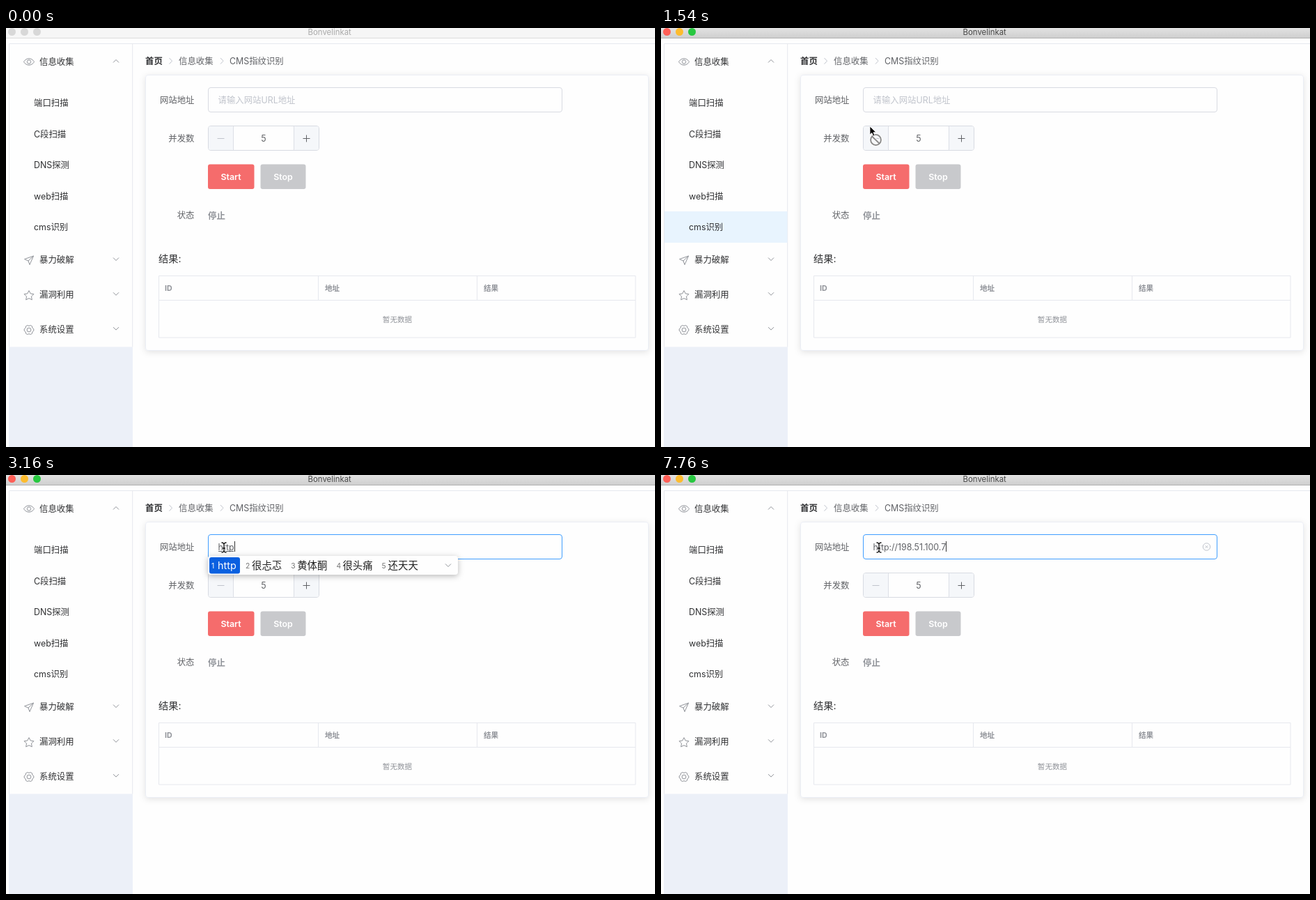
These frames come from a looping animation (932 by 601 pixels, 8 s). An HTML page:

```html
<!DOCTYPE html>
<html lang="zh-CN">
<head>
<meta charset="utf-8">
<style>
  html, body { margin: 0; width: 100%; height: 100%; overflow: hidden; background: #fefefe; }
  svg { display: block; font: 12.4px Inter, "Noto Sans CJK SC", "Noto Sans CJK", sans-serif; }
  .line { fill: none; stroke: #909399; stroke-width: 1; stroke-linejoin: round; }
  .edge { fill: none; stroke: #e6e8ee; }
  .box { fill: #fefefe; stroke: #d8dbe2; }
  .card { fill: #fefefe; stroke: #ebeef5; filter: drop-shadow(0 2px 5px rgba(0, 0, 0, .11)); }
  .popup { fill: #fefefe; filter: drop-shadow(0 2px 4px rgba(0, 0, 0, .28)); }
  .pointer { stroke: #fff; stroke-width: .8; }
</style>
</head>
<body>
<svg id="stage" width="932" height="601" viewBox="0 0 932 601"></svg>
<script>
const stage = document.getElementById('stage');
const DARK = '#303133', MID = '#606266', GRAY = '#909399', PALE = '#c0c4cc';

// y is the vertical centre of the line of text
function label(x, y, text, color = DARK, { size = 12.4, weight = 400, anchor = 'start', id = '' } = {}) {
  return `<text id="${id}" x="${x}" y="${y + size * .365}" fill="${color}" font-size="${size}"
    font-weight="${weight}" text-anchor="${anchor}">${text}</text>`;
}
const rect = (x, y, w, h, attrs) => `<rect x="${x}" y="${y}" width="${w}" height="${h}" ${attrs}/>`;
const path = (d, attrs = 'class="line"') => `<path d="${d}" ${attrs}/>`;
const chevron = (x, y, dir) => path(`M${x - 4} ${y - 2 * dir}l4 ${4 * dir}l4 ${-4 * dir}`);
const crumbArrow = x => path(`M${x - 2} 43l4 4.3l-4 4.3`, `fill="none" stroke="${PALE}"`);

function ring(cx, cy, count, radius) {
  return Array.from({ length: count }, (_, i) => {
    const a = i * 2 * Math.PI / count - Math.PI / 2, r = radius(i);
    return `${(cx + r * Math.cos(a)).toFixed(1)} ${(cy + r * Math.sin(a)).toFixed(1)}`;
  }).join('L');
}

function titleBar() {
  const lights = [8.5, 26.5, 44.5].map(x => `<circle class="light" cx="${x}" cy="5.5" r="5.5"/>`).join('');
  return `<linearGradient id="metal" x2="0" y2="1"><stop stop-color="#e2e2e2"/>
    <stop offset="1" stop-color="#cfcfcf"/></linearGradient>` +
    rect(0, 0, 932, 14, 'id="bar"') + rect(0, 14, 932, 1, 'id="barEdge"') + lights +
    label(464.7, 5.8, 'Bonvelinkat', '', { size: 11.4, anchor: 'middle', id: 'title' });
}

function sidebar() {
  const items = ['端口扫描', 'C段扫描', 'DNS探测', 'web扫描', 'cms识别'];
  const groups = ['暴力破解', '漏洞利用', '系统设置'];
  return rect(4, 457.5, 178, 144, 'fill="#ecf0f8"') +
    path('M932 22.5H4.5V457.5M181.7 22.5V457.5', 'class="edge"') +
    rect(5, 263, 176.5, 45, 'id="hover" fill="#e8f4fe"') +
    path('M25.5 48.5C29 42.3 37 42.3 40.5 48.5C37 54.7 29 54.7 25.5 48.5Z') +
    '<circle class="line" cx="33" cy="48.5" r="2.7"/>' +
    label(48, 48, '信息收集') + chevron(158, 47.5, -1) +
    items.map((s, i) => label(40, 107.7 + 44.5 * i, s)).join('') +
    groups.map((s, i) => label(48, 332.6 + 49.8 * i, s) + chevron(158, 331.5 + 49.8 * i, 1)).join('') +
    path('M26.5 331.5L39.5 327L34 339.5L32 334Z M32 334L39.5 327') +
    path(`M${ring(33, 384, 10, i => i % 2 ? 3.7 : 7.3)}Z`) +
    path(`M${ring(33, 433, 18, i => i % 3 ? 6.9 : 5.7)}Z`) +
    '<circle class="line" cx="33" cy="433" r="2.9"/>';
}

function form() {
  const right = { anchor: 'end' }, middle = { anchor: 'middle' };
  const button = { anchor: 'middle', weight: 600 };
  return label(200, 47.3, '首页', DARK, { weight: 700 }) + crumbArrow(236.5) +
    label(248, 47.3, '信息收集', MID) + crumbArrow(310) + label(321, 47.3, 'CMS指纹识别', MID) +
    rect(200.5, 67.5, 722, 395, 'rx="3.5" class="card"') +
    label(270.5, 103.3, '网站地址', MID, right) +
    rect(290.5, 85.5, 508, 35, 'rx="3.5" class="box" id="field"') +
    label(304.5, 103.3, '请输入网站URL地址', PALE, { id: 'hint' }) +
    label(304.5, 103.3, '', MID, { id: 'entry' }) +
    rect(305, 109, 0, 1, `id="underline" fill="${MID}"`) +
    rect(305, 95, 1, 15, 'id="caret" fill="#333"') +
    `<g id="clear" fill="none" stroke="${PALE}"><circle cx="783.5" cy="103" r="5.2"/>
      <path d="M781.7 101.2l3.6 3.6m0-3.6l-3.6 3.6"/></g>` +
    label(270.5, 158.3, '并发数', MID, right) +
    rect(290.5, 140.5, 159, 35, 'rx="3.5" class="box"') +
    rect(291, 141, 35.5, 34, 'rx="3" fill="#f5f7fa"') + rect(413.5, 141, 35.5, 34, 'rx="3" fill="#f5f7fa"') +
    path('M326.5 141v34M413.5 141v34', 'stroke="#dcdfe6"') +
    path('M303.5 158.5h10', `stroke="${PALE}"`) + path('M426.5 158.5h10m-5-5v10', `stroke="${MID}"`) +
    label(370, 158.5, '5', MID, middle) +
    rect(290, 195.5, 66.5, 35.5, 'rx="3" fill="#f56c6c"') + label(323, 213.5, 'Start', '#fff', button) +
    rect(365.5, 195.5, 65, 35.5, 'rx="3" fill="#c8c9cc"') + label(398, 213.5, 'Stop', '#fff', button) +
    label(270.5, 268.8, '状态', MID, right) + label(290, 269.5, '停止', GRAY, { weight: 700 });
}

function results() {
  const head = { size: 10.6, weight: 700 };
  return label(219, 331.2, '结果:', DARK, { size: 14.2 }) +
    path('M219.5 355.5H904V444H219.5ZM219.5 390.5H904M448.5 355.5v35M676.5 355.5v35', 'class="edge"') +
    label(228, 373.5, 'ID', GRAY, head) + label(458, 373.5, '地址', GRAY, head) +
    label(686, 373.5, '结果', GRAY, head) +
    label(562, 418, '暂无数据', GRAY, { size: 10.6, anchor: 'middle' });
}

function pointers() {
  return `<g id="blocked" fill="none"><circle cx="308.5" cy="160.5" r="7.4" stroke="#fff" stroke-width="4"/>
      <path d="M303 155.5l10.5 10" stroke="#fff" stroke-width="4"/>
      <g stroke="#8d8d8d" stroke-width="2"><circle cx="308.5" cy="160.5" r="7.4"/><path d="M303 155.5l10.5 10"/></g></g>
    <path id="arrow" class="pointer" d="M0 0V12L2.8 9.5L4.8 14L6.9 13.1L5 8.7H8.8Z"/>
    <g id="beam" fill="none"><path d="M-3.5-7Q0-7 0-4V4Q0 7-3.5 7M3.5-7Q0-7 0-4M0 4Q0 7 3.5 7M-2 1H2" stroke="#fff" stroke-width="2.6"/>
      <path d="M-3.5-7Q0-7 0-4V4Q0 7-3.5 7M3.5-7Q0-7 0-4M0 4Q0 7 3.5 7M-2 1H2" stroke="#111" stroke-width="1.3"/></g>`;
}

stage.innerHTML = titleBar() + sidebar() + form() + results() + '<g id="popup"></g>' + pointers();
const part = id => document.getElementById(id);
const lights = [...document.querySelectorAll('.light')];

function candidates(words) {
  let x = 295, marks = '';
  words.forEach((word, i) => {
    const width = word === 'http' ? 26 : word.length * 14.4;
    const end = x + 9 + width;
    if (!i) marks += rect(292, 118, end + 6 - 292, 23.5, 'rx="3" fill="#0a60e0"');
    marks += label(x, 130.3, i + 1, i ? '#777' : '#fff', { size: 10.3 }) +
      label(x + 9, 129.8, word, i ? '#222' : '#fff', { size: 14.4 });
    x = end + (i ? 13 : 14);
  });
  return rect(290, 116, 359, 27, 'rx="4" class="popup"') + marks + chevron(635, 129.5, 1);
}

const WORDS = {
  1: ['和', '好', '会', '还', '很'],
  2: ['会谈', '后台', '海滩', '合同', '航天'],
  3: ['很忐忑', '黄体酮', '很头痛', '还天天', '后天'],
  4: ['http', '很忐忑', '黄体酮', '很头痛', '还天天'],
};
const ADDRESS = 'http://198.51.100.7';
// Number of typed characters from each moment on
const KEYS = [[0, 0], [2560, 1], [2710, 2], [3010, 3], [3160, 4], [3460, 5], [3610, 6], [3760, 7],
  [5090, 8], [5240, 9], [5540, 11], [5840, 12], [5990, 13], [6130, 14], [6730, 15],
  [7020, 16], [7320, 17], [7460, 18], [7760, 19]];
const MOVES = [[650, 190, 580], [800, 150, 470], [950, 115, 380], [1100, 95, 318], [1250, 90, 288],
  [1390, 150, 265], [1540, 300, 141], [1690, 309, 113], [1840, 313, 104]];
const latest = (list, t) => list.findLast(step => step[0] <= t);
const show = (id, on) => part(id).setAttribute('visibility', on ? 'visible' : 'hidden');
const set = (id, name, value) => part(id).setAttribute(name, value);
let popupLength = -1;

function draw(t) {
  const active = t >= 500;
  set('bar', 'fill', active ? 'url(#metal)' : '#f6f6f6');
  set('barEdge', 'fill', active ? '#b1b1b1' : '#dcdcdc');
  set('title', 'fill', active ? '#484848' : '#aaa');
  lights.forEach((dot, i) => dot.setAttribute('fill', active ? ['#ff5f57', '#fdbc2e', '#28c840'][i] : '#d8d8d8'));

  show('hover', t >= 1250 && t < 1690);
  set('field', 'style', `stroke:${t >= 1980 ? '#409eff' : t >= 1690 ? PALE : '#d8dbe2'}`);

  const count = latest(KEYS, t)[1];
  const entry = part('entry');
  entry.textContent = ADDRESS.slice(0, count);
  const width = count ? entry.getComputedTextLength() : 0;
  show('hint', !count);
  set('underline', 'width', t < 4350 ? Math.max(0, width - 1) : 0);
  set('caret', 'x', Math.round(304.5 + width));
  show('caret', t >= 2120 && !(t >= 4800 && t < 5090));
  show('clear', t >= 4350);

  if (count !== popupLength) {
    popupLength = count;
    part('popup').innerHTML = WORDS[count] ? candidates(WORDS[count]) : '';
  }

  const move = latest(MOVES, t);
  show('arrow', move && t < 1690);
  show('beam', t >= 1690);
  show('blocked', t >= 1540 && t < 1690);
  if (move) for (const id of ['arrow', 'beam']) set(id, 'transform', `translate(${move[1]} ${move[2]})`);
}

const start = performance.now();
function tick() {
  draw((performance.now() - start) % 8000);
  requestAnimationFrame(tick);
}
tick();
</script>
</body>
</html>
```
